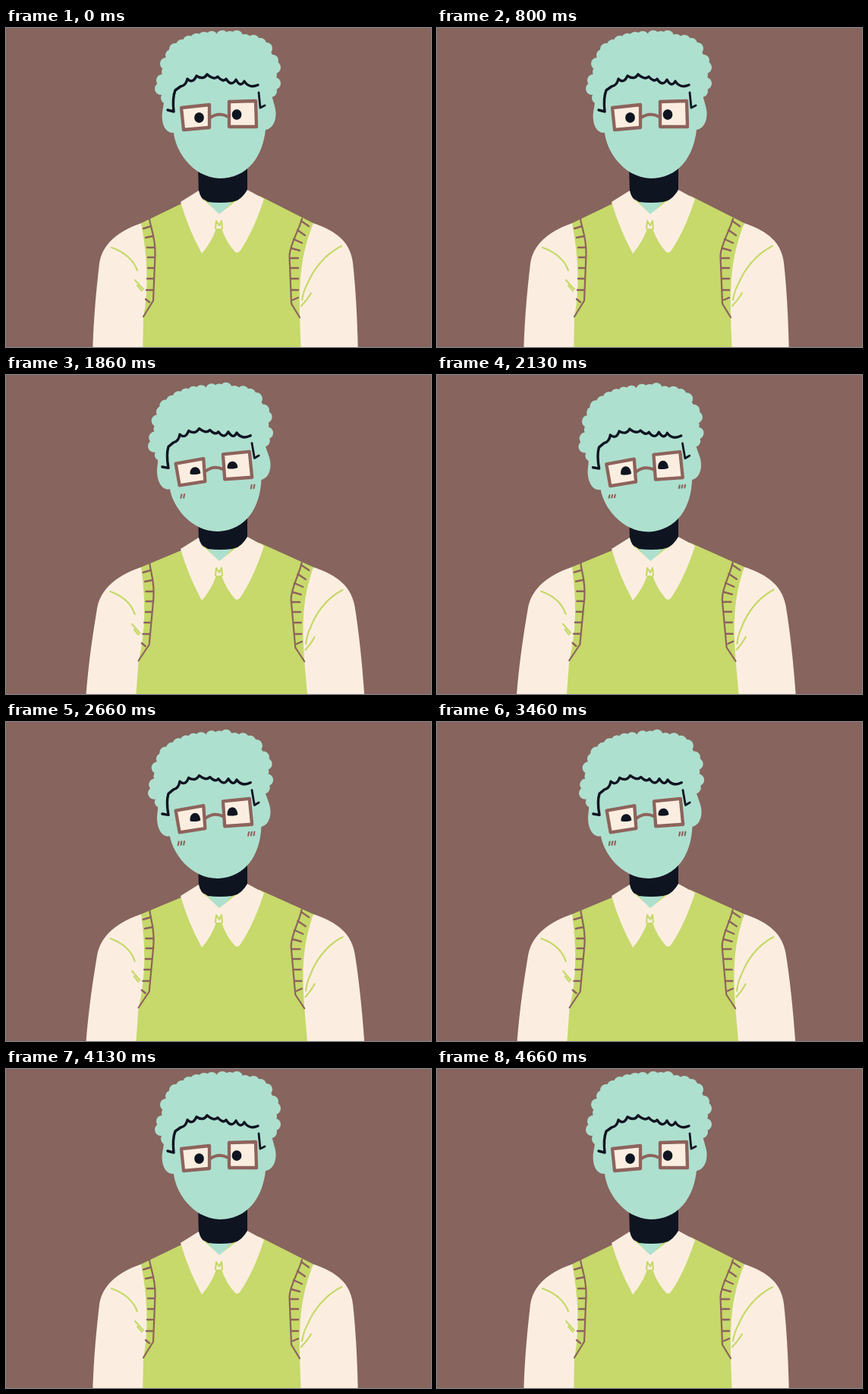
Animation of 560 by 420 pixels, one loop 5 s. Source, as an HTML page with a canvas:

```html
<!DOCTYPE html>
<html lang="en">
<head>
<meta charset="utf-8">
<title>Shy character</title>
<style>
  html, body { margin: 0; width: 100%; height: 100%; overflow: hidden; background: #87645e; }
  canvas { display: block; }
</style>
</head>
<body>
<canvas id="stage" width="560" height="420"></canvas>
<script>
const ctx = document.getElementById('stage').getContext('2d');
const BROWN = '#87645e', FRAME = '#8d635c', MINT = '#aee0cf', LIME = '#c6d96a',
      CREAM = '#fbeee0', INK = '#0f1421';
const LOOP = 5000;

// Lean amount per drawing, from the drawing at 1600 ms on; 0 is upright, 1 is leaning
const LEAN_IN = [.36, .8, 1, 1.12, 1.06];
const LEAN_OUT = [.64, .2, 0, -.12];

ctx.lineCap = ctx.lineJoin = 'round';

function fill(d, color) {
  ctx.fillStyle = color;
  ctx.fill(new Path2D(d));
}

function line(d, color, width) {
  ctx.strokeStyle = color;
  ctx.lineWidth = width;
  ctx.stroke(new Path2D(d));
}

function group(draw) {
  ctx.save();
  draw();
  ctx.restore();
}

// Three drawings every 400 ms
function drawingIndex(t) {
  const r = t % 400;
  return Math.floor(t / 400) * 3 + (r >= 260 ? 2 : r >= 130 ? 1 : 0);
}

function leanAt(n) {
  if (n < 12) return 0;
  if (n < 27) return LEAN_IN[n - 12] ?? 1;
  return LEAN_OUT[n - 27] ?? 0;
}

// Pupils squash, stretch, then settle
function blinkAt(t) {
  for (const start of [600, 4460]) {
    const d = t - start;
    if (d >= 0 && d < 140) return [1.15, .26];
    if (d >= 140 && d < 200) return [.95, 1.2];
  }
  return [1, 1];
}

// Shoulders rise while the arms spread below them
function shrug(lean, spread) {
  const slope = spread * lean;
  ctx.transform(1, 0, slope, 1, -257 * slope, -4 * lean);
}

function body(lean) {
  const shoulder = 257 - 4 * lean;
  fill(`M238 228L178 ${shoulder}L158 420H412L405 ${shoulder}L334 221Z`, LIME);

  group(() => {
    shrug(lean, -.052);
    fill('M178 257C158 264 128 278 123 310C119 345 115 384 114 434H180L181 381C188 344 187 304 178 257Z', CREAM);
    line('M189 251C190 262 197 274 196.5 298L194 359L181 380', FRAME, 2.2);
    line('M181 264L191 261M184 276L194 274M186 289H195M187 302H195M187 316H195M186 330H194M185 345H193M184 357L189 361', FRAME, 2.4);
    line('M139 289C156 295 168 306 173 319M170 332L181 344M173 339L179 346', LIME, 2.2);
  });

  group(() => {
    shrug(lean, .05);
    fill('M405 257C428 265 453 277 457 309C461 345 463 385 464 434H389L387 380C386 334 388 299 405 257Z', CREAM);
    line('M390 251C386 267 374 284 373.5 300L376 363L387 381', FRAME, 2.2);
    line('M389 254L399 261M384 266L394 273M379 278L390 283M376 290L387 293M375 303H385M375 316H385M376 330H385M376 345H385M378 358L385 355', FRAME, 2.4);
    line('M442 287C420 298 405 318 397 337Q392 346 390 358M402 349Q397 358 389 366', LIME, 2.2);
  });

  fill('M260 222H304L281 247Z', MINT);
  fill('M253 180H318V215Q310 227 298 229Q282 231 266 229L254 221Z', INK);
  fill('M254 214L230 229Q240 264 258 297Q271 282 277 264H284Q290 282 302 295Q305 297 308 294Q326 268 340 225L318 213Q312 224 300 230L281 245L265 230Q256 225 254 214Z', CREAM);
  line('M276 264L277 254L281 260L284 254L285 264', LIME, 2.2);
}

function hair() {
  const curls = [[212, 92], [204, 80], [206, 69], [213, 58], [211, 47], [218, 36], [223, 28],
    [232, 23], [241, 18], [251, 15], [261, 13], [271, 12], [285, 11], [295, 12], [304, 11],
    [315, 16], [326, 17], [335, 21], [343, 27], [343, 37], [351, 43], [354, 52], [349, 62],
    [354, 73], [349, 83], [341, 90]];
  fill('M' + curls.map(p => p.join(' ')).join('L') + 'Z', MINT);
  for (const [x, y] of curls) {
    ctx.beginPath();
    ctx.arc(x, y, 8, 0, 7);
    ctx.fill();
  }
}

function pupil(x, y, lean, [sx, sy], tall) {
  group(() => {
    const drop = Math.max(0, Math.min(1, lean));
    const bottom = 9 * (1 - drop) + 2 * drop;
    const top = -9 - 2 * drop - (tall ? 2 : 0);
    ctx.translate(x + 1.3 * drop, y + 1.5 * drop);
    ctx.scale(sx, sy);
    const w = 6.3 + .6 * drop;
    fill(`M${-w} 0C${-w} ${top} ${w} ${top} ${w} 0C${w} ${bottom} ${-w} ${bottom} ${-w} 0Z`, INK);
  });
}

function blush(x, y, n) {
  const jitter = n % 3 - 2;
  for (let i = n < 15 ? 1 : 0; i < 3; i++) {
    const left = x - 5 + i * 3.7;
    line(`M${left} ${y + 2.5 + jitter}L${left + 1.2} ${y - 2}`, FRAME, 2.1);
  }
}

function head(lean, n, blink) {
  group(() => {
    ctx.translate(281 - lean, 198 + 8 * lean);
    ctx.rotate(-4 * lean * Math.PI / 180);
    ctx.translate(-281, -198);

    hair();
    fill('M212 70L207 105C203 121 208 139 221 138C223 160 244 196 281 198C318 198 338 170 342 134C354 132 358 116 354 103L345 70Z', MINT);
    line('M213 108L221 110Q219 92 223 82L230 77Q237 76 239 67Q246 74 251 63Q260 69 265 61Q274 69 279 64Q286 72 290 67Q297 78 303 68Q309 79 314 70Q320 80 332 75', INK, 3.4);
    line('M333 85L335 105L341 102', INK, 2.8);

    const lenses = 'M231 105L268 101L268 131L234 134ZM294 97L329 96L330 130L294 130Z';
    fill(lenses, CREAM);
    line(lenses, FRAME, 4.3);
    line('M269 118Q281 110 293 117', FRAME, 4);

    const tall = n > 14 && n < 27 && n % 4 < 2;
    pupil(254.5, 118, lean, blink, tall);
    pupil(304, 114, lean, blink, tall);

    if (n >= 14 && n < 27) {
      blush(236, 148, n);
      blush(329, 142, n);
    }
  });
}

function render(now) {
  const t = now % LOOP;
  const n = drawingIndex(t);
  const lean = leanAt(n);
  ctx.fillStyle = BROWN;
  ctx.fillRect(0, 0, 560, 420);
  body(lean);
  head(lean, n, blinkAt(t));
}

let start;
function tick(now) {
  start ??= now;
  render(now - start);
  requestAnimationFrame(tick);
}
render(0);
requestAnimationFrame(tick);
</script>
</body>
</html>
```
